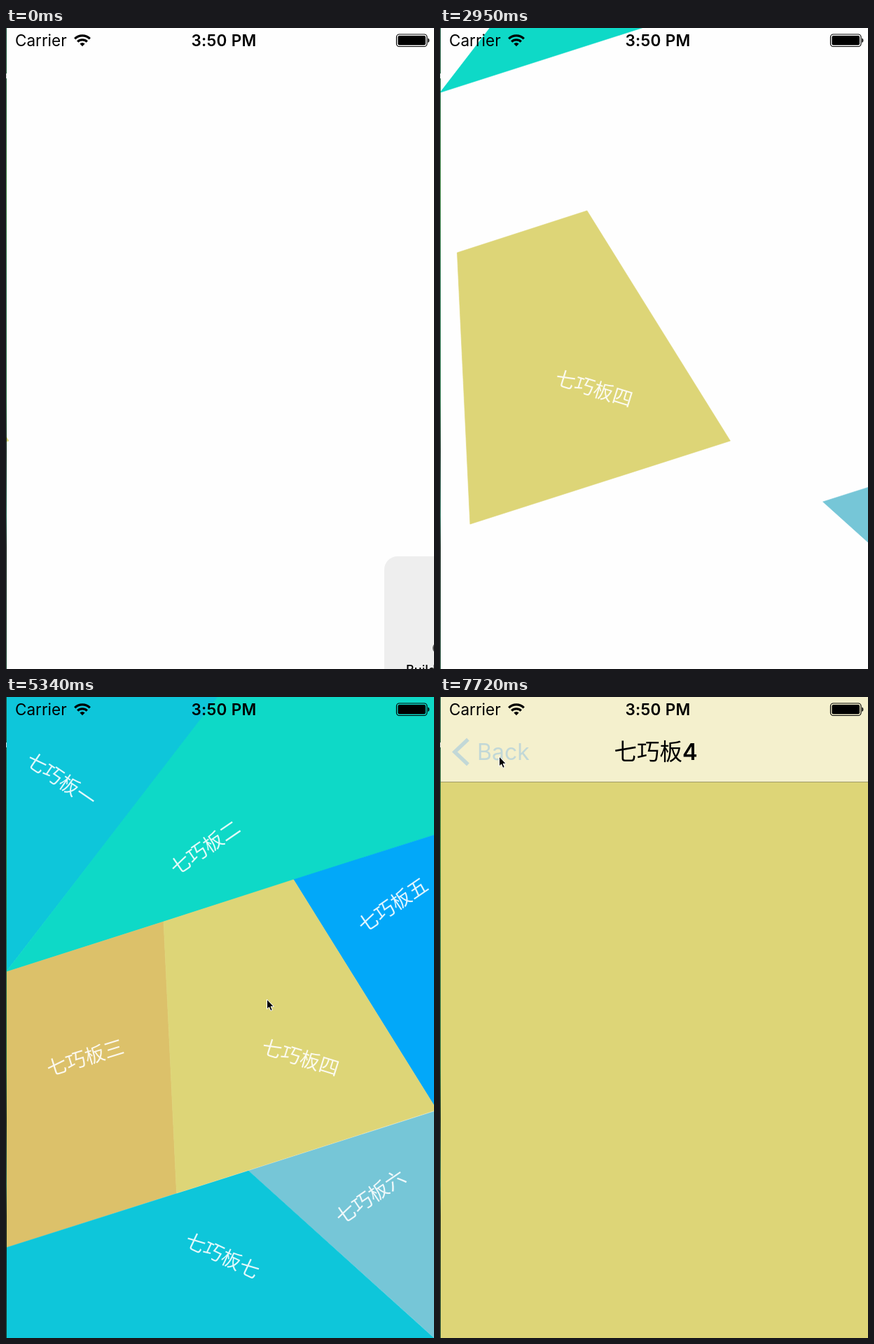
Recreate the animation shown at these times as an HTML page. Size 611x916 px, loop 8000 ms.

```html
<!DOCTYPE html>
<html lang="zh">
<head>
<meta charset="utf-8">
<title>Tangram menu</title>
<style>
  html, body { margin: 0; width: 100%; height: 100%; overflow: hidden; background: #fefefe; }
  svg { display: block; width: 611px; height: 916px; font-family: Inter, "Noto Sans CJK SC", "Noto Sans CJK", sans-serif; }
  .label { font: 300 28.4px "Noto Sans CJK SC", "Noto Sans CJK", sans-serif; fill: #fff; fill-opacity: .88; text-anchor: middle; }
  .mid { text-anchor: middle; font-weight: 600; }
</style>
</head>
<body>
<svg viewBox="0 0 611 916">
  <defs>
    <linearGradient id="desk" x1="0" y1="0" x2="0" y2="1">
      <stop offset="0" stop-color="#14503a"/>
      <stop offset=".25" stop-color="#2f7a34"/>
      <stop offset=".4" stop-color="#1f6a45"/>
      <stop offset=".58" stop-color="#1c6a3c"/>
      <stop offset=".66" stop-color="#0a2418"/>
      <stop offset=".76" stop-color="#1c6650"/>
      <stop offset=".81" stop-color="#0b1d14"/>
      <stop offset="1" stop-color="#15452f"/>
    </linearGradient>
  </defs>
  <rect width="611" height="916" fill="#fefefe"/>
  <g id="menu"></g>
  <rect id="dim" width="611" height="916" opacity="0"/>

  <g id="detail">
    <rect width="611" height="916" fill="#ddd577"/>
    <rect width="611" height="121" fill="#f4f0cd"/>
    <rect y="121" width="611" height="1" fill="#a09b68"/>
    <g id="back" fill="#007aff">
      <path d="M40 60.5L21 78.5L40 96.5" fill="none" stroke="#007aff" stroke-width="5.4"/>
      <text x="53" y="90" font-size="32">Back</text>
    </g>
    <text class="mid" x="308" y="90" font-size="32.5"><tspan font-weight="500">七巧板</tspan>4</text>
  </g>

  <g id="hud">
    <rect x="540" y="755" width="120" height="200" rx="19" fill="#eee"/>
    <circle cx="617" cy="886" r="8" fill="#555"/>
    <text x="571" y="924" font-size="18" font-weight="500">Build Succeeded</text>
  </g>

  <text x="13" y="26" font-size="22.5">Carrier</text>
  <g fill="none" stroke="#000" stroke-width="3.2">
    <path d="M98.2 15.4a15.3 15.3 0 0 1 21.6 0M102.2 19.6a9.6 9.6 0 0 1 13.6 0"/>
    <path d="M109 26.2l-3.6 -3.7a5 5 0 0 1 7.2 0z" fill="#000" stroke="none"/>
  </g>
  <text class="mid" x="311" y="26" font-size="22.5" letter-spacing=".3">3:50 PM</text>
  <rect x="557.5" y="9" width="43.5" height="17.5" rx="4" fill="none" stroke="#000" stroke-width="1.2"/>
  <rect x="559.5" y="11" width="39.5" height="13.5" rx="2"/>
  <path d="M602.4 14.5q2 .5 2 3.2t-2 3.2z"/>

  <rect width="1" height="916" fill="url(#desk)"/>
  <rect y="65" width="1" height="7" fill="#c8d0cc"/>
  <path id="cursor" d="M0 0V14L3.1 11.2L5.3 16.4L7.8 15.3L5.6 10.3H9.8Z" stroke="#fff" stroke-width="1"/>
</svg>
<script>
const W = 611, H = 916, LOOP = 8000, STEP = LOOP / 54;
const $ = id => document.getElementById(id);
const mix = (a, b, p) => a + (b - a) * p;
const clamp = x => Math.min(1, Math.max(0, x));

// polygon, colour, label centre and angle, start offset in screens
const pieces = [
  { n: "一", c: "#0ec6da", pts: [0,-1, 304,-1, 0,393], at: [79,118,34.4], from: [-1,-1] },
  { n: "二", c: "#0ed9c7", pts: [303,-1, 615,-1, 615,196, 0,393], at: [284,215,-34.4], from: [0,-1] },
  { n: "三", c: "#dcc16a", pts: [0,393, 225,321, 243.5,709, 0,787], at: [113,515,-17.2], from: [-2,0] },
  { n: "五", c: "#02a8f9", pts: [410.5,261, 615,196, 615,590], at: [552,297,-34.4], from: [1,0] },
  { n: "六", c: "#76c6d7", pts: [346,677, 615,591, 615,919], at: [520,714,-34.4], from: [1,0] },
  { n: "七", c: "#0ec6da", pts: [0,787, 346,677, 612,917, 0,917], at: [309,798,25.5], from: [0,1] },
  { n: "四", c: "#ddd577", pts: [225,321, 410.5,261, 615,590, 243.5,709], at: [420.5,515,17.2], from: [-1,0] }
];
const full = [0,0, W,0, W,H, 0,H];

function add(parent, tag, attrs) {
  const el = document.createElementNS("http://www.w3.org/2000/svg", tag);
  for (const k in attrs) el.setAttribute(k, attrs[k]);
  return parent.appendChild(el);
}
for (const p of pieces) {
  p.g = add($("menu"), "g", {});
  p.shape = add(p.g, "polygon", { points: p.pts, fill: p.c, stroke: p.c, "stroke-width": .6 });
  const [x, y, a] = p.at;
  add(p.g, "text", { class: "label", y: 10.6, transform: `translate(${x} ${y}) rotate(${a})` })
    .textContent = "七巧板" + p.n;
}
const chosen = pieces[6];

// cubic-bezier(.42, 0, .58, 1)
function easeInOut(x) {
  x = clamp(x);
  let lo = 0, hi = 1, s = x;
  for (let i = 0; i < 24; i++) {
    s = (lo + hi) / 2;
    const r = 1 - s;
    if (1.26 * s * r * r + 1.74 * s * s * r + s * s * s < x) lo = s; else hi = s;
  }
  return s * s * (3 - 2 * s);
}
function spring(ms) {
  const q = Math.max(0, ms) * .016;
  return ms > 560 ? 1 : 1 - (1 + q) * Math.exp(-q);
}
const move = (el, x, y) => el.setAttribute("transform", `translate(${x.toFixed(2)} ${y.toFixed(2)})`);

function cursorAt(t) {
  const enter = easeInOut((t - 4550) / 330);
  const leave = easeInOut((t - 6670) / 730);
  return [mix(mix(565, 372.5, enter), 84.5, leave), mix(mix(318, 432, enter), 85, leave)];
}

function draw(t) {
  $("hud").setAttribute("opacity", t < 290 ? 1 : t < 440 ? .4 : 0);

  const away = 1 - easeInOut((t - 1008) / 3000);
  for (const p of pieces) move(p.g, p.from[0] * W * away, p.from[1] * H * away);

  const grow = easeInOut((t - 5333) / 440);
  chosen.shape.setAttribute("points", chosen.pts.map((v, i) => mix(v, full[i], grow)));

  const push = spring(t - 6300);
  move($("menu"), -.3 * W * push, 0);
  $("dim").setAttribute("opacity", .1 * push);
  move($("detail"), W * (1 - push), 0);
  $("detail").setAttribute("visibility", push > 0 ? "visible" : "hidden");
  $("back").setAttribute("opacity", mix(1, .2, clamp((t - 7407) / 290)));

  $("cursor").setAttribute("visibility", t > 4580 ? "visible" : "hidden");
  move($("cursor"), ...cursorAt(t));
}

function tick() {
  const t = performance.now() % LOOP;
  draw(Math.floor((t + 10) / STEP) % 54 * STEP);
  requestAnimationFrame(tick);
}
tick();
</script>
</body>
</html>
```
